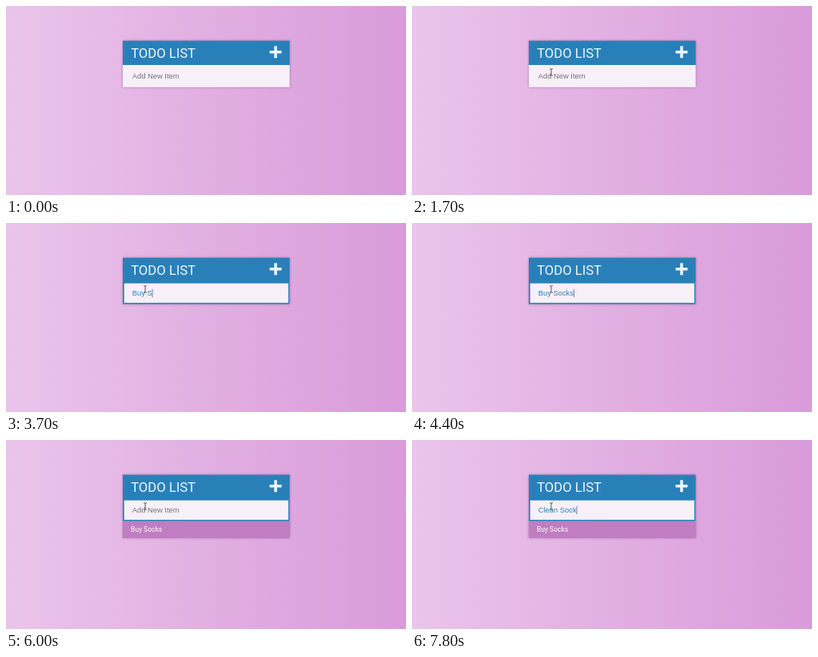
Write an HTML page that moves like this. It is 500x237 px and loops after 8000 ms.

```html
<!DOCTYPE html>
<html lang="en">
<head>
<meta charset="utf-8">
<title>Todo list</title>
<style>
  html, body { margin: 0; width: 100%; height: 100%; overflow: hidden; }
  body { background: linear-gradient(to right, #eac4ea, #d99bda); }
  svg { display: block; width: 500px; height: 237px; }
  text { white-space: pre; }
  .roboto { font-family: Roboto, sans-serif; fill: #fff; }
  #field { font: 9.4px "Liberation Sans", Arial, sans-serif; }
  #card { filter: drop-shadow(0 0 1.5px rgba(60, 20, 60, .4)); }
</style>
</head>
<body>
<svg viewBox="0 0 500 237">
  <g id="card">
    <rect x="146" y="43.6" width="208.6" height="31" fill="#2980b9"/>
    <rect x="146" y="74" width="208.6" height="27.8" fill="#f8f0f8"/>
    <rect id="item" x="146" y="101.8" width="208.6" height="21" fill="#c07dc1"/>
  </g>
  <rect id="border" x="146.85" y="74.85" width="206.9" height="26.1" fill="none" stroke="#2980b9" stroke-width="1.7"/>
  <text class="roboto" x="156.2" y="65" font-size="16.6" fill-opacity=".93">TODO LIST</text>
  <path d="M337 52V63.400M331.300 57.700H342.700" stroke="#eef5fa" stroke-width="3.500" stroke-linecap="square"/>
  <text id="label" class="roboto" x="156" y="115" font-size="8.5">Buy Socks</text>
  <text id="field" x="157.7" y="90.800"></text>
  <rect id="caret" y="82.800" width=".7" height="10.400" fill="#2c6390"/>
  <g id="pointer">
    <path id="arrow" d="M0 0V9.500L2.200 7.500 3.700 10.800 5.100 10.200 3.700 7H6.600Z" fill="#222" stroke="#fff" stroke-width=".6"/>
    <path id="beam" d="M-2-4.300Q0-4.300 0-3.300Q0-4.300 2-4.300M0-3.300V3.300M-2 4.300Q0 4.300 0 3.300Q0 4.300 2 4.300" fill="none" stroke="#444" stroke-width=".9"/>
  </g>
</svg>
<script>
const LOOP = 8000, FOCUS = 1900, ADDED = 4700;
const ENTER = 1100, ARRIVE = 1700;
const TEXT_X = 157.7;
const entries = [
  { text: "Buy Socks", keys: [2900, 3100, 3300, 3400, 3700, 3900, 4200, 4300, 4400], end: ADDED },
  { text: "Clean Sock", keys: [6300, 6400, 6500, 6600, 6700, 7000, 7300, 7500, 7700, 7800], end: LOOP }
];
// Caret visible while the empty field has focus
const blinks = [[FOCUS, 2200], [2600, 2900], [ADDED, 5200], [5500, 5800]];

const $ = id => document.getElementById(id);
const show = (id, on) => $(id).style.display = on ? "" : "none";

function typedAt(t) {
  const entry = entries.find(e => t >= e.keys[0] && t < e.end);
  return entry ? entry.text.slice(0, entry.keys.filter(k => k <= t).length) : "";
}

function drawPointer(t) {
  const p = Math.min(1, Math.max(0, (t - ENTER) / (ARRIVE - ENTER)));
  const ease = 1 - (1 - p) ** 2;
  const x = 214 - 40 * ease, y = 19 + 64 * ease;
  show("pointer", t >= ENTER);
  show("arrow", y < 74);
  show("beam", y >= 74);
  $("pointer").setAttribute("transform", `translate(${x} ${y})`);
}

function draw(t) {
  const typed = typedAt(t), field = $("field");
  field.textContent = typed || "Add New Item";
  field.setAttribute("fill", typed ? "#2980b9" : "#777078");
  const width = typed ? field.getComputedTextLength() : 0;
  $("caret").setAttribute("x", TEXT_X + width);
  show("caret", typed || blinks.some(([on, off]) => t >= on && t < off));
  show("border", t >= FOCUS);
  show("item", t >= ADDED);
  show("label", t >= ADDED);
  drawPointer(t);
}

function frame() {
  draw(performance.now() % LOOP);
  requestAnimationFrame(frame);
}
frame();
</script>
</body>
</html>
```
